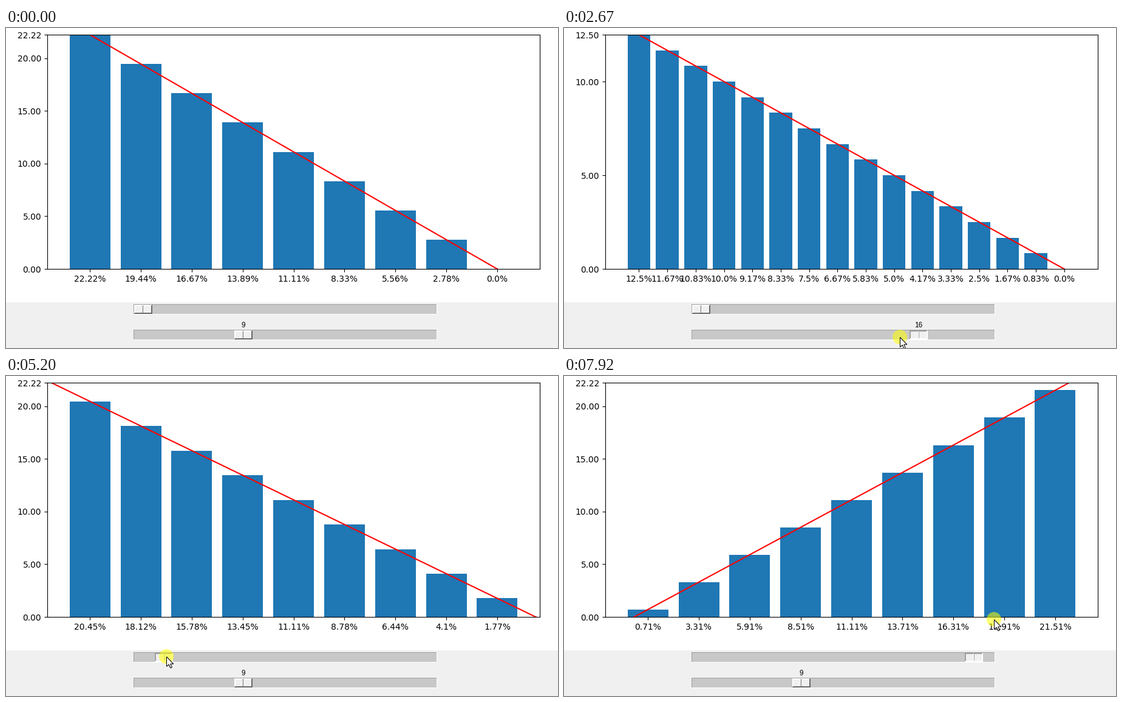
Animation of 909x526 px, one loop 7.99 s. Source, as a matplotlib script:

```python
import numpy as np
import matplotlib.pyplot as plt
from matplotlib.animation import FuncAnimation
from matplotlib.patches import Circle, Polygon, Rectangle

W, H, DPI = 909, 526, 100
FRAMES, INTERVAL = 235, 34          # 7990 ms per loop
START, STEP_MS = 500, 68.5          # the screen refreshes in steps after a pause
MIN_BARS, MAX_BARS, LOW, HIGH = 3, 20, 9, 16
NOTCH = 27.5                        # slider pixels per bar
LEFT, TOP, RIGHT, BOTTOM = 67.9, 11.1, 879.3, 396.1

# key points of the second drag; tilt is a share of the steepest slope
DRAG_STEPS = 64, 77, 91, 108
TILT = 1, 0.4824, -0.21643, -0.936
TILT_KNOB = 211, 321, 467, 660

# pointer tip (step, x, y), without the sideways part of the first drag
POINTER = np.array([
    (-1, 398, 528), (5, 390, 504), (43, 390, 510), (48, 223, 452), (54, 223, 453),
    (59, 224, 461), (64, 224, 461), (77, 354, 461), (91, 504, 433), (108, 708, 400),
]).T

plt.rcParams["font.family"] = "DejaVu Sans"
plt.rcParams["font.size"] = 10

fig = plt.figure(figsize=(W / DPI, H / DPI), dpi=DPI, facecolor="white")
chart = fig.add_axes([LEFT / W, 1 - BOTTOM / H, (RIGHT - LEFT) / W, (BOTTOM - TOP) / H])
bars = chart.bar(range(MAX_BARS), [0] * MAX_BARS, color="#1f77b4")
trend, = chart.plot([], [], color="red", lw=1.5)

panel = fig.add_axes([0, 0, 1, 1], zorder=5)
panel.set(xlim=(0, W), ylim=(H, 0))
panel.axis("off")


def rect(x, y, w, h, color, z=1):
    patch = Rectangle((x, y), w, h, facecolor=color, lw=0, antialiased=False, zorder=z)
    return panel.add_patch(patch)


def ramp(step, start, end):
    return np.clip((step - start) / (end - start), 0, 1)


def count_drag(step):
    """Share of the way from LOW to HIGH: out with speed-up, back with slow-down."""
    return ramp(step, 13, 27) ** 2 * ramp(step, 42, 32) ** 1.2


class Bevel:
    """A box with one light and one dark pixel edge."""

    def __init__(self, dx, y, w, h):
        self.dx = dx
        self.shade = rect(dx, y, w, h, "white", 2)
        self.light = rect(dx, y, w - 1, h - 1, "white", 2)
        self.face = rect(dx, y + 1, w - 2, h - 2, "#f0f0f0", 2)

    def place(self, left, light, shade):
        x = left + self.dx
        self.shade.set(x=x, facecolor=shade)
        self.light.set(x=x, facecolor=light)
        self.face.set_x(x + 1)


class Slider:
    def __init__(self, y):
        rect(210, y, 500, 17, "white")
        rect(210, y, 499, 16, "#a0a0a0")
        rect(211, y + 1, 498, 15, "#c8c8c8")
        self.boxes = [Bevel(0, y + 1, 30, 15), Bevel(1, y + 2, 14, 13),
                      Bevel(15, y + 2, 14, 13)]

    def place(self, left, pressed):
        edges = ("#a0a0a0", "white") if pressed else ("white", "#696969")
        for box in self.boxes:
            box.place(left, *edges)


rect(0, 451, W, H - 451, "#f0f0f0", 0)
tilt_slider, count_slider = Slider(454), Slider(496)
count_text = panel.text(0, 487, "", family="Liberation Sans", size=8.5,
                        ha="center", va="center_baseline", zorder=3)
glow = panel.add_patch(Circle((0, 0), 12, facecolor="yellow", alpha=0.55, lw=0, zorder=4))
ARROW = np.array([(0, 0), (0, 16), (3.7, 12.6), (6.4, 18.4), (8.8, 17.4),
                  (6.3, 11.7), (11.3, 11.7)]) + 0.5
arrow = panel.add_patch(Polygon(ARROW, facecolor="white", edgecolor="black",
                                lw=0.75, zorder=5))


def draw_chart(count, tilt):
    mean = 100 / count
    slope = -tilt * 2 * mean / (count - 1)

    def level(i):
        return mean + slope * (i - (count - 1) / 2)

    for i, bar in enumerate(bars):
        bar.set_height(max(level(i), 0) if i < count else 0)
    trend.set_data([-1, count], [level(-1), level(count)])

    chart.set_xticks(range(count), [f"{abs(round(level(i), 2))}%" for i in range(count)])
    top = 2 * mean
    ticks = [*range(0, int(top) - 1, 5), top]
    chart.set_yticks(ticks, [f"{v:.2f}" for v in ticks])
    margin = 0.05 * (count - 0.2)
    chart.set_xlim(-0.4 - margin, count - 0.6 + margin)
    chart.set_ylim(0, top)


def update(frame):
    step = round(((frame + 0.5) * INTERVAL - START) / STEP_MS)
    span = HIGH - LOW
    count = round(float(LOW + span * count_drag(step)))
    draw_chart(count, float(np.interp(step, DRAG_STEPS, TILT)))

    on_count, on_tilt = 10 <= step < 44, step >= 61
    knob = int(211.5 + NOTCH * (count - MIN_BARS))
    count_slider.place(knob, on_count)
    count_text.set(text=str(count), x=knob + 14.5)
    tilt_slider.place(round(np.interp(step, DRAG_STEPS, TILT_KNOB)), on_tilt)

    # the knob trails a little behind the pointer
    lead = NOTCH * span * count_drag(step + 1.3)
    steps, xs, ys = POINTER
    tip = np.round([np.interp(step, steps, xs) + lead, np.interp(step, steps, ys)])
    arrow.set_xy(ARROW + tip)
    glow.center = tuple(tip)
    glow.set_visible(on_count or on_tilt)
    return []


anim = FuncAnimation(fig, update, frames=FRAMES, interval=INTERVAL,
                     init_func=lambda: update(0), repeat=True, repeat_delay=0)
plt.show()
```
